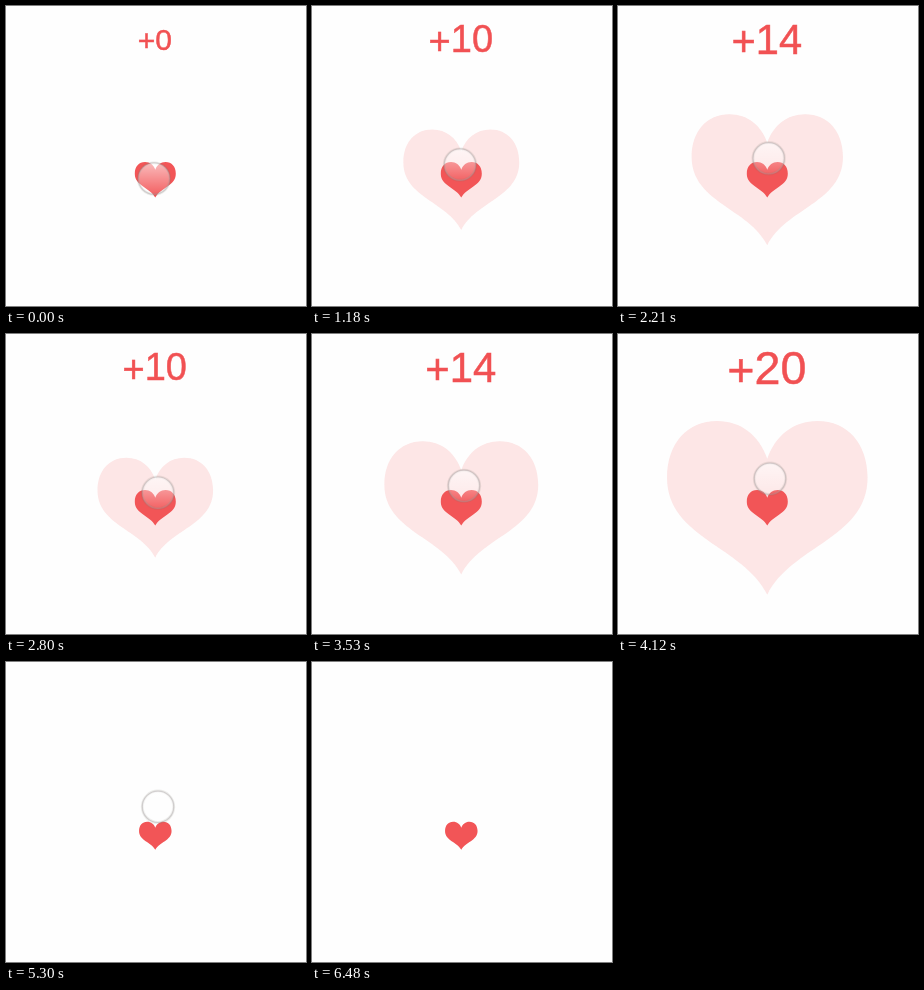
An HTML page that plays this animation: 300x300 px, repeating every 7170 ms.

```html
<!DOCTYPE html>
<html lang="en">
<head>
<meta charset="utf-8">
<title>Press and drag to like</title>
<style>
  html, body { margin: 0; height: 100%; overflow: hidden; background: #fefefe; }
  svg { display: block; width: 300px; height: 300px; }
  text {
    font-family: "Liberation Sans", Arial, sans-serif; text-anchor: middle;
    fill: #f15153; stroke: #f15153; stroke-width: .5px;
  }
</style>
</head>
<body>
<svg viewBox="0 0 300 300" fill="#f25557">
  <defs>
    <path id="shape" d="M0-.245C.04-.36 .13-.433 .25-.433C.4-.433 .5-.32 .5-.15C.5 .15 .12 .19 0 .433C-.12 .19-.5 .15-.5-.15C-.5-.32-.4-.433-.25-.433C-.13-.433-.04-.36 0-.245Z"/>
    <linearGradient id="glass" x2="0" y2="1">
      <stop stop-color="#fff" stop-opacity=".6"/>
      <stop offset="1" stop-color="#fff" stop-opacity=".08"/>
    </linearGradient>
  </defs>
  <use id="halo" href="#shape" fill="#fde6e6"/>
  <use id="heart" href="#shape"/>
  <g id="touch">
    <circle r="15.7" fill="none" stroke="#776" stroke-opacity=".13" stroke-width="3"/>
    <circle r="15.7" fill="url(#glass)" stroke="#a09a9c" stroke-opacity=".4" stroke-width="1.2"/>
  </g>
  <text id="count" x="148.8"><tspan dy=".05em">+</tspan><tspan id="digits" dy="-.05em"></tspan></text>
</svg>
<script>
const LOOP = 7170, STEP = 147, RELEASE = 4450;
// Drag amount over time: [ms, points]
const DRAG = [[250, 0], [1850, 15.45], [2950, 9.27], [4160, 20.1]];
const [halo, heart, touch, count, digits] =
  ['halo', 'heart', 'touch', 'count', 'digits'].map(id => document.getElementById(id));

const span = (t, a, b) => Math.min(1, Math.max(0, (t - a) / (b - a)));
const mix = (a, b, p) => a + (b - a) * p;
const easeInOut = p => (1 - Math.cos(Math.PI * p)) / 2;
const easeOut = p => 1 - (1 - p) ** 3;

function dragAt(t) {
  let n = DRAG[0][1];
  for (let i = 1; i < DRAG.length; i++) {
    const [t0] = DRAG[i - 1], [t1, to] = DRAG[i];
    n = mix(n, to, easeInOut(span(t, t0, t1)));
  }
  return n;
}

function setWidth(el, w) {
  el.setAttribute('transform', `translate(149.3 173.8) scale(${w})`);
}

function draw(t) {
  const n = dragAt(t);
  setWidth(halo, mix(38 + 8.1 * n, 32, easeOut(span(t, RELEASE, RELEASE + 500))));
  setWidth(heart, mix(41, 32.5, easeOut(span(t, RELEASE, RELEASE + 250))));

  const x = mix(148, 152, span(t, 1400, 2600));
  const y = Math.max(144.8, 172.6 - 1.45 * n);
  touch.setAttribute('transform', `translate(${x} ${y})`);
  touch.setAttribute('opacity', 1 - span(t, 5450, 5880));

  const gone = span(t, RELEASE + 100, 5290), size = 30 + 0.83 * n;
  digits.textContent = Math.round(n);
  count.setAttribute('font-size', size);
  count.setAttribute('y', 33.2 + size * 0.35 + 16 * gone);
  count.setAttribute('opacity', 1 - gone);
}

const start = performance.now();
function tick() {
  const t = (performance.now() - start) % LOOP;
  draw(Math.floor(t / STEP) * STEP);
  requestAnimationFrame(tick);
}
tick();
</script>
</body>
</html>
```
